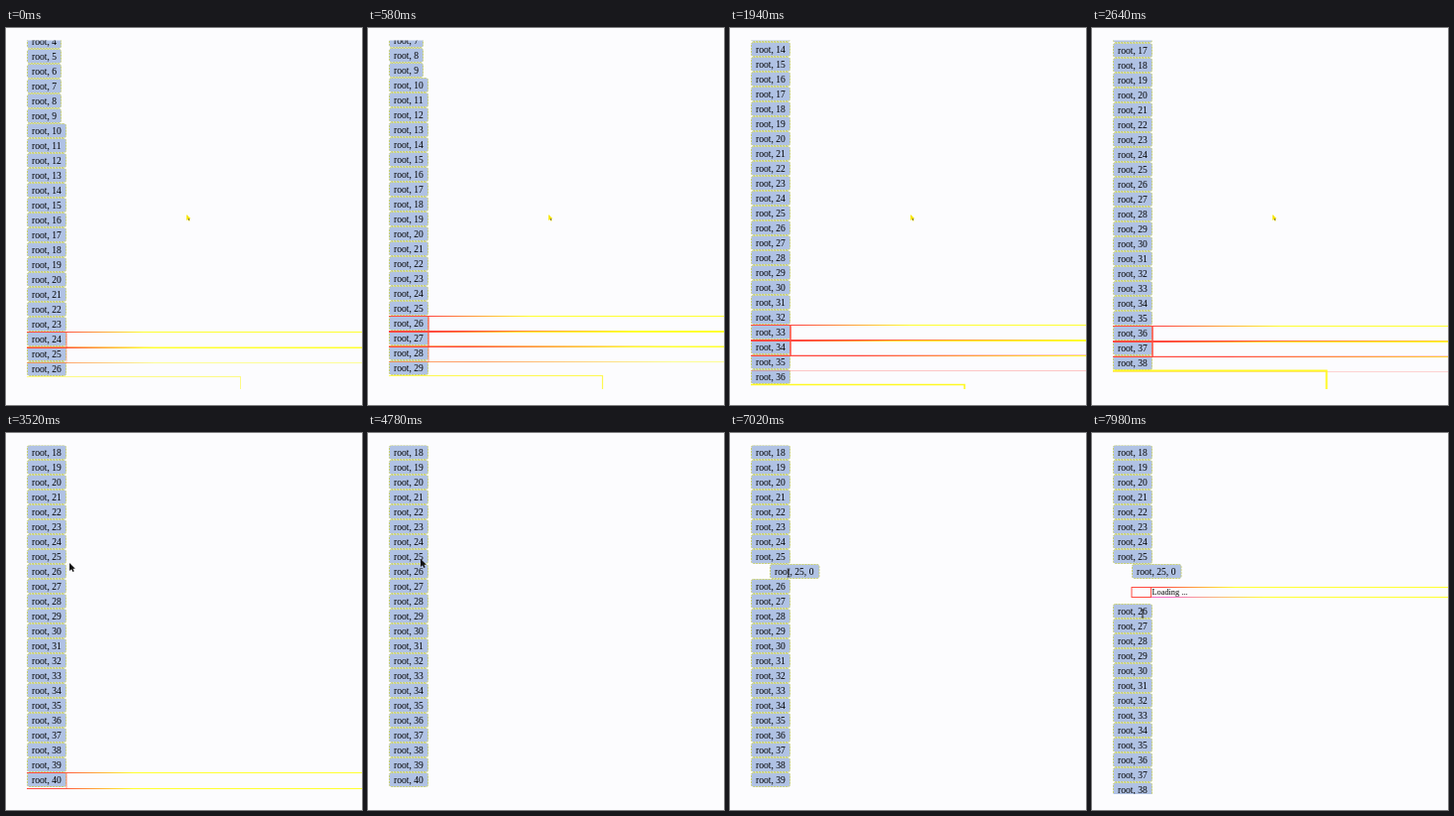
Animation of 359 by 380 pixels, one loop 8000 ms. Source, as an HTML page with a canvas:

```html
<!DOCTYPE html>
<html lang="en">
<head>
<meta charset="utf-8">
<style>
  html, body { margin: 0; width: 100%; height: 100%; overflow: hidden; background: #fcfcfe; }
  canvas { display: block; width: 359px; height: 380px; }
</style>
</head>
<body>
<canvas id="stage"></canvas>
<script>
const LOOP = 8000, PITCH = 15, TOP = 12.5, BOTTOM = 364, WIDTH = 359;
const LOAD = 5300, CHILD = 6040, LOAD_CHILD = 7500, FLASH = 830;
const RED = '#ff4a40', YELLOW = '#ffff30';

const canvas = document.getElementById('stage');
const ctx = canvas.getContext('2d');
const dpr = window.devicePixelRatio || 1;
canvas.width = WIDTH * dpr;
canvas.height = 380 * dpr;
ctx.scale(dpr, dpr);

const clamp = (v, lo = 0, hi = 1) => Math.min(hi, Math.max(lo, v));
const easeInOut = u => u * u * (3 - 2 * u);
const snap = y => Math.ceil(y - 1) + 0.5;

// Linear between [time, ...values] keys; an easing may be applied to each span.
function track(keys, t, ease = u => u) {
  const i = keys.findIndex(k => k[0] > t);
  if (i < 0) return keys[keys.length - 1].slice(1);
  if (i === 0) return keys[0].slice(1);
  const a = keys[i - 1], b = keys[i];
  const u = ease((t - a[0]) / (b[0] - a[0]));
  return a.slice(1).map((v, j) => v + (b[j + 1] - v) * u);
}

function scrollAt(t) {
  if (t > 2640) return 250.5 - 18.5 * (1 - clamp((t - 2640) / 660)) ** 2;
  return track([[-1280, -53.5], [0, 46.5], [1280, 147], [2640, 232]], t)[0];
}

// Moment at which each row enters the list while scrolling.
const bornAt = Array.from({ length: 41 }, (_, n) => {
  const entered = t => n * PITCH - scrollAt(t) < 352;
  let t = -550;
  if (entered(t)) return -Infinity;
  while (!entered(t) && t < 3400) t += 5;
  return t;
});

function line(x1, y1, x2, y2, color, width = 1) {
  ctx.strokeStyle = color;
  ctx.lineWidth = width;
  ctx.beginPath();
  ctx.moveTo(x1, y1);
  ctx.lineTo(x2, y2);
  ctx.stroke();
}

function label(text, x, y, size = 9.6) {
  ctx.font = `${size}px "Liberation Serif", "Times New Roman", serif`;
  ctx.fillStyle = '#000';
  ctx.fillText(text, x, y);
}

function row(text, x, y, width) {
  ctx.fillStyle = '#b0c2e4';
  ctx.beginPath();
  ctx.roundRect(x, y - 7, width, 14, 2);
  ctx.fill();
  ctx.strokeStyle = '#c8d070';
  ctx.lineWidth = 1;
  ctx.setLineDash([2, 1]);
  ctx.stroke();
  ctx.setLineDash([]);
  label(text, x + 4.5, y + 3.5);
}

// Repaint highlight: a red wedge that runs out over a yellow line.
function flashLine(x, y, age, power, tint = RED) {
  const reach = 60 + 340 * power * clamp((FLASH - age) / 400);
  if (reach > 390) return line(x, y, WIDTH, y, tint);
  line(x, y, WIDTH, y, YELLOW);
  ctx.fillStyle = tint;
  ctx.beginPath();
  ctx.moveTo(x, y - 0.5);
  ctx.lineTo(x + reach * 0.3, y - 0.5);
  ctx.lineTo(x + reach, y + 0.5);
  ctx.lineTo(x, y + 0.5);
  ctx.fill();
}

// Top and bottom edge of a full-width list entry.
function flashRow(y, age, power) {
  ctx.globalAlpha = clamp((age - 150) / 300);
  flashLine(21, y - 7, age, power);
  flashLine(21, y + 9, age, power);
  if (age > 250) line(61, y - 7, 61, y + 9, RED, 0.5 + power);
  ctx.globalAlpha = 1;
}

function drawRows(t, shift) {
  const scroll = scrollAt(t);
  const limit = t >= LOAD_CHILD ? 372 : 352;
  const power = track([[0, 0.2], [1000, 1], [2900, 1], [3450, 0.15]], t)[0];
  const flashes = [];
  let end = 0;
  for (let n = 0; n <= 40; n++) {
    const place = n * PITCH - scroll + (n > 25 ? shift : 0);
    if (place < 0 || place >= limit) continue;
    const y = snap(place);
    row('root, ' + n, 21.5, y, n < 10 ? 34 : 39);
    end = y + 8;
    const age = t - bornAt[n];
    if (age >= 0 && age < FLASH) flashes.push({ y, age });
  }
  // Newest first, so the strong highlights stay on top.
  for (const { y, age } of flashes.reverse()) flashRow(y, age, power);
  if (t < 2950 || (t >= LOAD && t < 6800)) drawElbow(t, end);
}

function drawElbow(t, y) {
  ctx.globalAlpha = clamp(0.55 + t / 2400);
  ctx.strokeStyle = '#fff924';
  ctx.lineWidth = 1 + clamp(t / 2600);
  ctx.beginPath();
  ctx.moveTo(21, y);
  ctx.lineTo(236.5, y);
  ctx.lineTo(236.5, BOTTOM);
  ctx.stroke();
  ctx.globalAlpha = 1;
}

function drawLoading(x, y, age) {
  if (age < FLASH) {
    flashLine(x, y - 4.5, age, 0.15);
    flashLine(x, y + 5.5, age, 0.25, '#f66fc0');
    ctx.strokeStyle = RED;
    ctx.lineWidth = 1;
    ctx.strokeRect(x, y - 4.5, 19.5, 10);
  }
  label('Loading ...', x + 20.5, y + 3, 8.3);
}

function drawChild(age) {
  const y = 139.5;
  row('root, 25, 0', 40.5, y, 49.5);
  if (age >= FLASH) return;
  flashLine(21, y - 7, age, 0.15, '#f04a50');
  flashLine(39, y + 9, age, 0.15, '#a83038');
  line(39.5, y - 7, 39.5, y + 9, '#f03028', 2);
  line(91, y - 7, 91, y + 9, '#f03028', 2);
}

function drawCursor(t) {
  const [x, y] = track([
    [0, 182, 188], [2950, 182, 188], [3450, 64, 131], [4180, 64, 131],
    [4700, 53, 127], [5400, 53, 127], [6000, 59, 141],
    [7500, 59, 141], [7850, 51, 182]
  ], t, easeInOut);
  if (t >= 5700) {
    line(x, y - 4, x, y + 4, '#222', 1);
    line(x - 1.5, y - 4, x + 1.5, y - 4, '#222', 0.7);
    line(x - 1.5, y + 4, x + 1.5, y + 4, '#222', 0.7);
    return;
  }
  const resting = t < 2950;
  ctx.save();
  ctx.translate(x, y);
  if (resting) ctx.scale(0.75, 0.75);
  ctx.fillStyle = resting ? '#f7e600' : '#111';
  ctx.fill(new Path2D('M0 0V8L2 6.3L3.4 9L4.7 8.3L3.4 5.8H5.8Z'));
  if (resting) {
    ctx.fillStyle = '#6b5c18';
    ctx.fillRect(2.6, 5.4, 1.3, 2.4);
  }
  ctx.restore();
}

function draw(t) {
  ctx.fillStyle = '#fcfcfe';
  ctx.fillRect(0, 0, WIDTH, 380);
  ctx.save();
  ctx.beginPath();
  ctx.rect(0, TOP, WIDTH, BOTTOM - TOP);
  ctx.clip();
  const shift = t >= LOAD_CHILD ? 40 : t >= CHILD ? 15 : t >= LOAD ? 25 : 0;
  drawRows(t, shift);
  if (t >= LOAD && t < CHILD) drawLoading(21, 145, t - LOAD);
  if (t >= CHILD) drawChild(t - CHILD);
  if (t >= LOAD_CHILD) drawLoading(40, 160, t - LOAD_CHILD);
  ctx.restore();
  drawCursor(t);
}

const start = performance.now();
function tick() {
  draw((performance.now() - start) % LOOP);
  requestAnimationFrame(tick);
}
tick();
</script>
</body>
</html>
```
